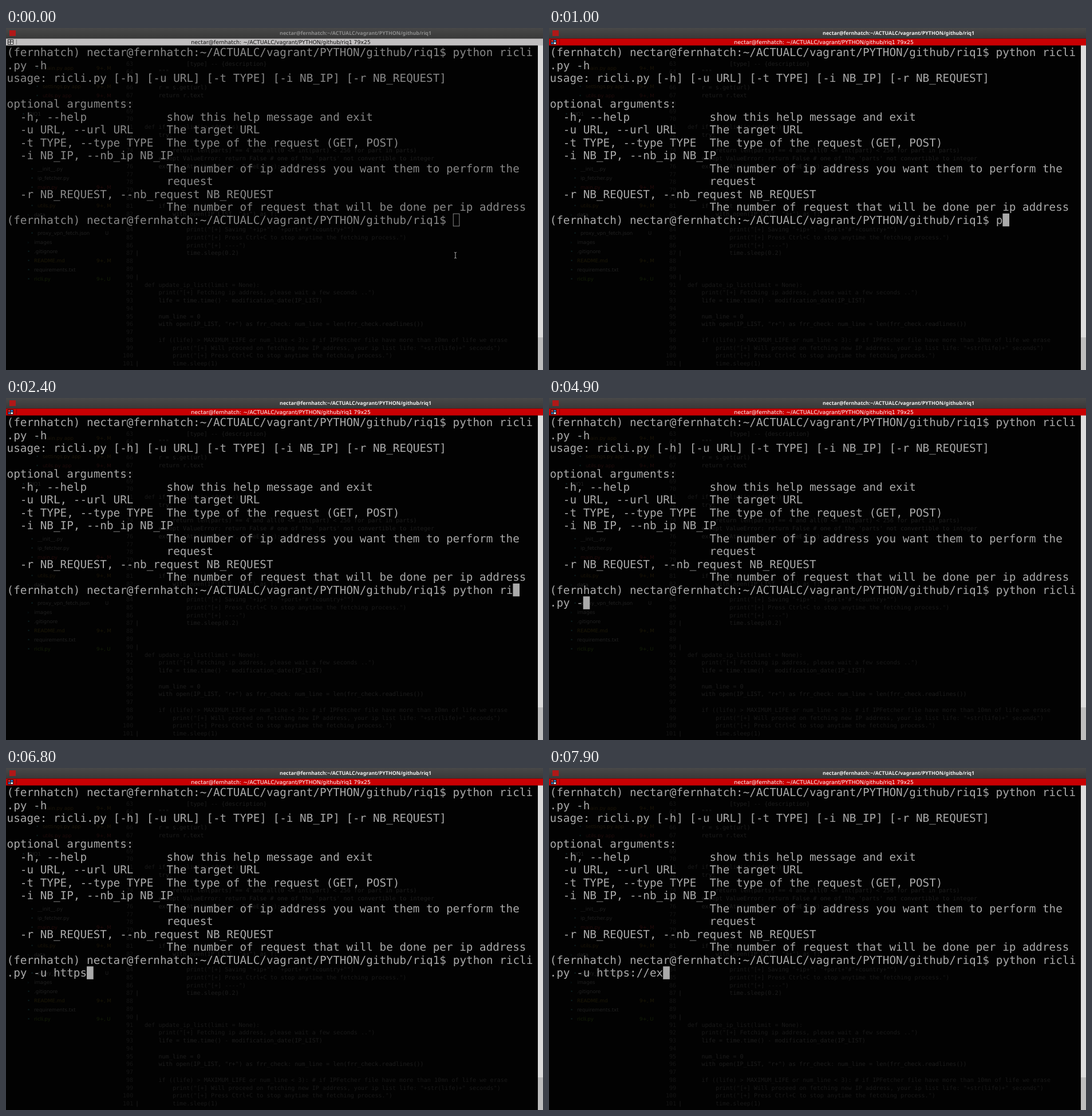
Animation, 938 px wide and 597 px high, one loop 8000 ms. Source, as an HTML page:

```html
<!DOCTYPE html>
<html lang="en">
<head>
<meta charset="utf-8">
<title>Terminal</title>
<style>
  html, body { margin: 0; width: 100%; height: 100%; overflow: hidden; background: #020202; }
  svg { display: block; }
  text { white-space: pre; text-rendering: geometricPrecision; }
  .term { font: 19.32px "DejaVu Sans Mono", monospace; fill: var(--ink); }
  .code { font: 10.15px "DejaVu Sans Mono", monospace; fill: #1d1d1d; }
  .side { font: 8.66px "DejaVu Sans", sans-serif; fill: #202020; }
  .title { font: bold 8.86px "Noto Sans", sans-serif; fill: var(--title); text-anchor: end; }
  .bar { font: 9.38px "DejaVu Sans", sans-serif; fill: var(--barInk); text-anchor: end; }
  #stage { --ink: #888; --title: #8c8c8c; --bar: #c0bebf; --barInk: #111; --tile: #c0bebf; --blue: #c0bebf; }
  #stage.active { --ink: #aaa; --title: #f0f0f0; --bar: #c80003; --barInk: #fff; --tile: #e03030; --blue: #3a78c0; }
</style>
</head>
<body>
<svg id="stage" width="938" height="597" viewBox="0 0 938 597">
  <defs>
    <linearGradient id="chrome" x2="0" y2="1">
      <stop stop-color="#484848"/><stop offset="1" stop-color="#393939"/>
    </linearGradient>
  </defs>
  <rect width="938" height="597" fill="#020202"/>
  <g id="behind"></g>
  <rect x="929" y="30" width="9" height="567" fill="#dcdcdc"/>
  <rect x="929" y="540" width="9" height="57" fill="#bdbdbd"/>
  <rect width="938" height="18.5" fill="url(#chrome)"/>
  <rect x="6" y="4" width="11" height="10" fill="#b01818"/>
  <rect y="18.5" width="938" height="12" fill="var(--bar)"/>
  <g stroke="#181818" stroke-width=".9">
    <rect x="3.5" y="20.5" width="4.5" height="4" fill="var(--tile)"/>
    <rect x="8" y="20.5" width="4.5" height="4" fill="var(--blue)"/>
    <rect x="3.5" y="24.5" width="4.5" height="4" fill="var(--blue)"/>
    <rect x="8" y="24.5" width="4.5" height="4" fill="#eee"/>
    <path d="M18.5 20v9" opacity=".45"/>
  </g>
  <g id="screen"></g>
  <rect id="cursor" stroke="var(--ink)"/>
  <path id="pointer" d="M783 391.5q2 0 2 1.5q0-1.5 2-1.5M785 393v8M783 402q2 0 2-1.5q0 1.5 2 1.5" fill="none" stroke="#aaa"/>
</svg>
<script>
const LOOP = 8000, CELL = 11.631, ROW = 22.5, LEFT = 1.5, TOP = 31.3;
const $ = id => document.getElementById(id);
const stage = $('stage'), cursor = $('cursor'), pointer = $('pointer');

function addText(parent, cls, x, y, str, fill) {
  const el = document.createElementNS('http://www.w3.org/2000/svg', 'text');
  el.setAttribute('class', cls);
  el.setAttribute('x', x);
  el.setAttribute('y', y);
  if (fill) el.style.fill = fill;
  el.textContent = str;
  return parent.appendChild(el);
}
const addRow = (row, col, str) =>
  addText($('screen'), 'term', LEFT + col * CELL, TOP + 17.9 + row * ROW, str);

// Editor showing faintly through the terminal: line number, indent, code
const press = 'print("[+] Press Ctrl+C to stop anytime the fetching process.")';
const code = [
  [63, 12, '[type] -- {description}'],
  [64, 4, '"""'],
  [66, 4, 'r = s.get(url)'],
  [67, 4, 'return r.text'],
  [71, 0, 'def if_ip_valid(ip_address):'],
  [72, 4, 'try:'],
  [74, 8, 'return len(parts) == 4 and all(0 <= int(part) < 256 for part in parts)'],
  [75, 4, "except ValueError: return False # one of the 'parts' not convertible to integer"],
  [76, 4, 'except (AttributeError, TypeError): return False'],
  [81, 4, 'if ip not in lines:'],
  [82, 8, 'with open(IP_LIST, "a+") as f:'],
  [84, 12, 'print("[+] Saving "+ip+": "+port+"#"+country+"")'],
  [85, 12, press],
  [86, 12, 'print("[+] ----")'],
  [87, 12, 'time.sleep(0.2)'],
  [91, 0, 'def update_ip_list(limit = None):'],
  [92, 4, 'print("[+] Fetching ip address, please wait a few seconds ..")'],
  [93, 4, 'life = time.time() - modification_date(IP_LIST)'],
  [95, 4, 'num_line = 0'],
  [96, 4, 'with open(IP_LIST, "r+") as frr_check: num_line = len(frr_check.readlines())'],
  [98, 4, 'if ((life) > MAXIMUM_LIFE or num_line < 3): # if IPFetcher file have more than 10mn of life we erase'],
  [99, 8, 'print("[+] Will proceed on fetching new IP address, your ip list life: "+str(life)+" seconds")'],
  [100, 8, press],
  [101, 8, 'time.sleep(1)']
];
const behind = $('behind');
const codeY = n => 451.5 + (n - 91) * 13.77;
for (let n = 63; n <= 101; n++) addText(behind, 'code', n > 99 ? 204 : 210, codeY(n), n, '#151515');
for (const n of [87, 90, 101]) addText(behind, 'code', 226, codeY(n), '|', '#202020');
for (const [n, indent, str] of code) {
  const dim = n > 97 || /^print|^def/.test(str);
  addText(behind, 'code', 242 + indent * 6.11, codeY(n), str, dim ? '#191919' : '');
}

// Editor file list: y, x, name, status, colour
const files = [
  [70, 64, 'main.py app', '9+, M', '#1c1508'],
  [102, 64, 'settings.py app', '9+, M', '#1c1508'],
  [118, 64, 'utils.py app', '9+, M', '#200c0c'],
  [150, 40, 'RIQ1'],
  [246, 55, '__init__.py'],
  [262, 55, 'ip_fetcher.py'],
  [278, 55, 'main.py', '9+, M', '#240c0c'],
  [310, 55, 'utils.py', '9+, M', '#1c1508'],
  [326, 49, 'data'],
  [358, 55, 'proxy_vpn_fetch.json', 'U'],
  [374, 49, 'images'],
  [390, 49, '.gitignore'],
  [406, 49, 'README.md', '9+, M', '#1e1a08'],
  [422, 49, 'requirements.txt'],
  [438, 49, 'ricli.py', '9+, U', '#152008']
];
for (const [y, x, name, status, fill] of files) {
  addText(behind, 'side', x, y + 3, name, fill);
  addText(behind, 'side', x - 12, y + 3, name === 'images' || name === 'data' ? '›' : '•', '#0d1f20');
  if (status) addText(behind, 'side', status === 'U' ? 173 : 158, y + 3, status, fill);
}

const user = 'nectar', host = 'fernhatch', path = '~/ACTUALC/vagrant/PYTHON/github/riq1';
const prompt = `(${host}) ${user}@${host}:${path}$ `;
addText(stage, 'title', 743, 12.3, `${user}@${host}:${path}`);
addText(stage, 'bar', 637, 27.6, `${user}@${host}: ${path} 79x25`);

[
  prompt + 'python ricli',
  '.py -h',
  'usage: ricli.py [-h] [-u URL] [-t TYPE] [-i NB_IP] [-r NB_REQUEST]',
  '',
  'optional arguments:',
  '  -h, --help            show this help message and exit',
  '  -u URL, --url URL     The target URL',
  '  -t TYPE, --type TYPE  The type of the request (GET, POST)',
  '  -i NB_IP, --nb_ip NB_IP',
  '                        The number of ip address you want them to perform the',
  '                        request',
  '  -r NB_REQUEST, --nb_request NB_REQUEST',
  '                        The number of request that will be done per ip address',
  prompt
].forEach((str, row) => addRow(row, 0, str));

const command = 'python ricli.py -u https://ex';
const keys = [1000, 1300, 1400, 1500, 1600, 1800, 2000, 2300, 2400,
  ...Array(8).fill(4900), 5000, 5200, 6200, 6300, 6500, 6700, 6800,
  7100, 7400, 7500, 7700, 7900];
const wrap = 79 - prompt.length;
const head = addRow(13, prompt.length, ''), tail = addRow(14, 0, '');
const show = (el, on) => el.setAttribute('visibility', on ? 'visible' : 'hidden');

function draw(now) {
  const t = now % LOOP;
  const active = t >= 300;
  const typed = keys.filter(k => k <= t).length;
  const blink = (t >= 900 && t < 1000) || (t >= 5800 && t < 6200);
  const wrapped = typed >= wrap;
  const col = wrapped ? typed - wrap : prompt.length + typed;
  const inset = active ? 0 : 0.5;

  stage.classList.toggle('active', active);
  head.textContent = command.slice(0, Math.min(typed, wrap));
  tail.textContent = command.slice(wrap, Math.max(typed, wrap));
  const box = {
    x: LEFT + col * CELL + inset,
    y: TOP + (wrapped ? 14 : 13) * ROW + inset,
    width: CELL - 2 * inset,
    height: ROW - 2 * inset,
    fill: active ? 'var(--ink)' : 'none',
    'stroke-width': active ? 0 : 1
  };
  for (const name in box) cursor.setAttribute(name, box[name]);
  show(cursor, !blink);
  show(pointer, !typed); // typing hides the mouse pointer
}

const start = performance.now();
function tick() {
  draw(performance.now() - start);
  requestAnimationFrame(tick);
}
tick();
</script>
</body>
</html>
```
